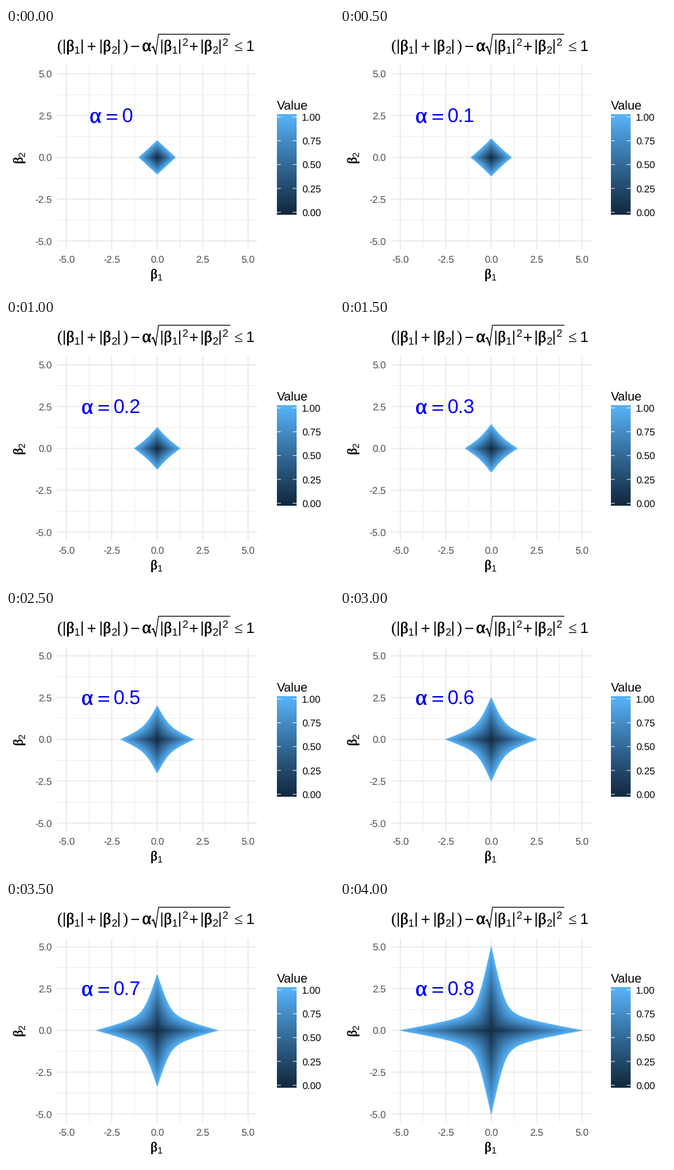
A matplotlib script for the animation above (4.5 s loop, 500 px wide and 400 px high).

```python
import numpy as np
import matplotlib.pyplot as plt
from matplotlib.animation import FuncAnimation
from matplotlib.colors import ListedColormap
from matplotlib.patches import Polygon
from matplotlib.patheffects import withStroke

plt.rcParams["text.hinting"] = "none"
plt.rcParams["text.hinting_factor"] = 1

W, H, DPI = 500, 400, 100
PX = 72 / DPI
SANS, SERIF = "Liberation Sans", "Liberation Serif"
GRID, GREY, BLUE = "#EBEBEB", "#4D4D4D", "#0000F0"
X0, Y0, SX, SY = 230.5, 196.8, 27.7, 25.43
EM, BAR_GAP = 23.2, 27.3

XYZ = np.array([[.4124, .3576, .1805], [.2126, .7152, .0722], [.0193, .1192, .9505]])
WHITE = XYZ.sum(axis=1)


def to_lab(rgb):
    c = np.array(rgb) / 255
    f = np.cbrt(XYZ @ (((c + .055) / 1.055) ** 2.4) / WHITE)
    return np.array([116 * f[1] - 16, 500 * (f[0] - f[1]), 200 * (f[1] - f[2])])


def to_rgb(lab):
    fy = (lab[:, 0] + 16) / 116
    f = np.stack([fy + lab[:, 1] / 500, fy, fy - lab[:, 2] / 200], axis=1)
    xyz = np.where(f > 6 / 29, f ** 3, (f - 4 / 29) * 3 * (6 / 29) ** 2) * WHITE
    lin = np.clip(xyz @ np.linalg.inv(XYZ).T, 0, 1)
    return np.where(lin > .0031308, 1.055 * lin ** (1 / 2.4) - .055, 12.92 * lin)


def blues(n=256):
    t = np.linspace(0, 1, n)[:, None]
    low, high = to_lab((19, 43, 67)), to_lab((86, 177, 247))
    return ListedColormap(to_rgb(low + t * (high - low)))


CMAP = blues()

fig = plt.figure(figsize=(W / DPI, H / DPI), dpi=DPI, facecolor="white")
ax = fig.add_axes([0, 0, 1, 1])
ax.axis("off")


def put(x, y, s, size, font=SANS, color="black", **kw):
    kw = {"ha": "left", "va": "baseline", "zorder": 6, **kw}
    return ax.text(x, y, s, fontsize=size * PX, family=font, color=color, **kw)


def greek(x, y, s, size, color="black", **kw):
    """Greek letter, slightly emboldened."""
    t = put(x, y, s, size, SERIF, color, **kw)
    t.set_path_effects([withStroke(linewidth=.5 * PX, foreground=color)])
    return t


def line(xs, ys, width, color="black", z=5):
    return ax.plot(xs, ys, color=color, lw=width * PX, zorder=z, snap=False,
                   solid_capstyle="butt", solid_joinstyle="miter")[0]


def draw_panel():
    left, right = X0 - 5.5 * SX, X0 + 5.5 * SX
    top, bottom = Y0 - 5.5 * SY, Y0 + 5.5 * SY
    for k in range(-4, 5):
        v = k * 1.25
        x, y = X0 + v * SX, Y0 - v * SY
        major = k % 2 == 0
        width = 1.9 if major else .95
        line([x, x], [top, bottom], width, GRID, 1)
        line([left, right], [y, y], width, GRID, 1)
        if major:
            put(x, 357.3, f"{v:.1f}", 15.4, color=GREY, ha="center")
            put(70, y + 5.5, f"{v:.1f}", 15.4, color=GREY, ha="right")
    greek(220.5, 380.7, "β", 20)
    put(231, 384.5, "1", 13.5)
    up = {"rotation": 90, "rotation_mode": "anchor"}
    greek(25, 206.5, "β", 20, **up)
    put(29, 196, "2", 13.5, **up)


def draw_legend():
    put(413, 124, "Value", 19.3)
    ramp = np.clip(np.linspace(1.026, -.026, 306), 0, 1)[:, None]
    ax.imshow(ramp, cmap=CMAP, vmin=0, vmax=1, extent=(413, 443, 284, 131.5),
              aspect="auto", zorder=2)
    for k in range(5):
        y = 280.2 - 36.25 * k
        for x in (413, 437):
            line([x, x + 6], [y, y], .9, "white")
        put(451, y + 5.5, f"{k / 4:.2f}", 15.4)


def abs_beta(x, sub, square=False):
    """|β_sub| with its left bar at x."""
    for bar in (x, x + BAR_GAP):
        line([bar, bar], [17.5, 39], 1.8)
    greek(x + 3, 35, "β", EM * 1.04)
    put(x + 15.2, 39.3, sub, 16.2)
    if square:
        put(x + BAR_GAP + 3, 26.7, "2", 16.2)


def minus(x, y=28):
    line([x - 6, x + 6], [y, y], 1.7)


def plus(x, y=28):
    minus(x, y)
    line([x, x], [y - 6, y + 6], 1.7)


def draw_title():
    put(77.5, 35, "(", EM + 2, SERIF)
    abs_beta(88.8, "1")
    plus(130.5)
    abs_beta(144.8, "2")
    put(177, 35, ")", EM + 2, SERIF)
    minus(197)
    greek(207.5, 35, "α", EM * 1.15)
    line([222, 224.5, 228.5], [30, 28.5, 40], 1.8)
    line([228, 232.5, 342], [41, 9.5, 9.5], 1.2)
    abs_beta(237.5, "1", True)
    plus(286.3)
    abs_beta(299, "2", True)
    put(348, 35, "≤", EM * 1.04, SERIF)
    put(365.5, 35, "1", EM)


draw_panel()
draw_legend()
draw_title()

bx = np.abs(np.linspace(-5.5, 5.5, 611))[None, :]
by = np.abs(np.linspace(-5.5, 5.5, 561))[:, None]
theta = np.linspace(0, 2 * np.pi, 721)
cos, sin = np.cos(theta), np.sin(theta)

shape = ax.add_patch(Polygon([[0, 0]], fc="none", ec=CMAP(1.0), lw=PX,
                             joinstyle="round", zorder=4))
field = ax.imshow(bx + by, cmap=CMAP, vmin=0, vmax=1, aspect="auto", zorder=3,
                  extent=(X0 - 5.5 * SX, X0 + 5.5 * SX, Y0 + 5.5 * SY, Y0 - 5.5 * SY))
ax.set_xlim(0, W)
ax.set_ylim(H, 0)

alpha_sign = greek(0, 144, "α", 34, BLUE)
equals = [line([0, 0], [y, y], 2.2, BLUE, 6) for y in (132, 138.5)]
number = put(0, 144, "", 30.3, SANS, BLUE)


def update(i):
    a = i / 10
    r = 1 / (np.abs(cos) + np.abs(sin) - a)
    shape.set_xy(np.column_stack([X0 + SX * r * cos, Y0 - SY * r * sin]))
    field.set_data(bx + by - a * np.hypot(bx, by))
    field.set_clip_path(shape)
    left = 127.5 if i == 0 else 115
    alpha_sign.set_x(left)
    for bar in equals:
        bar.set_xdata([left + 26, left + 42])
    number.set_x(left + 49)
    number.set_text(f"{a:g}")
    return shape, field, alpha_sign, *equals, number


anim = FuncAnimation(fig, update, frames=9, interval=500, repeat=True,
                     repeat_delay=0, blit=False)
plt.show()
```
